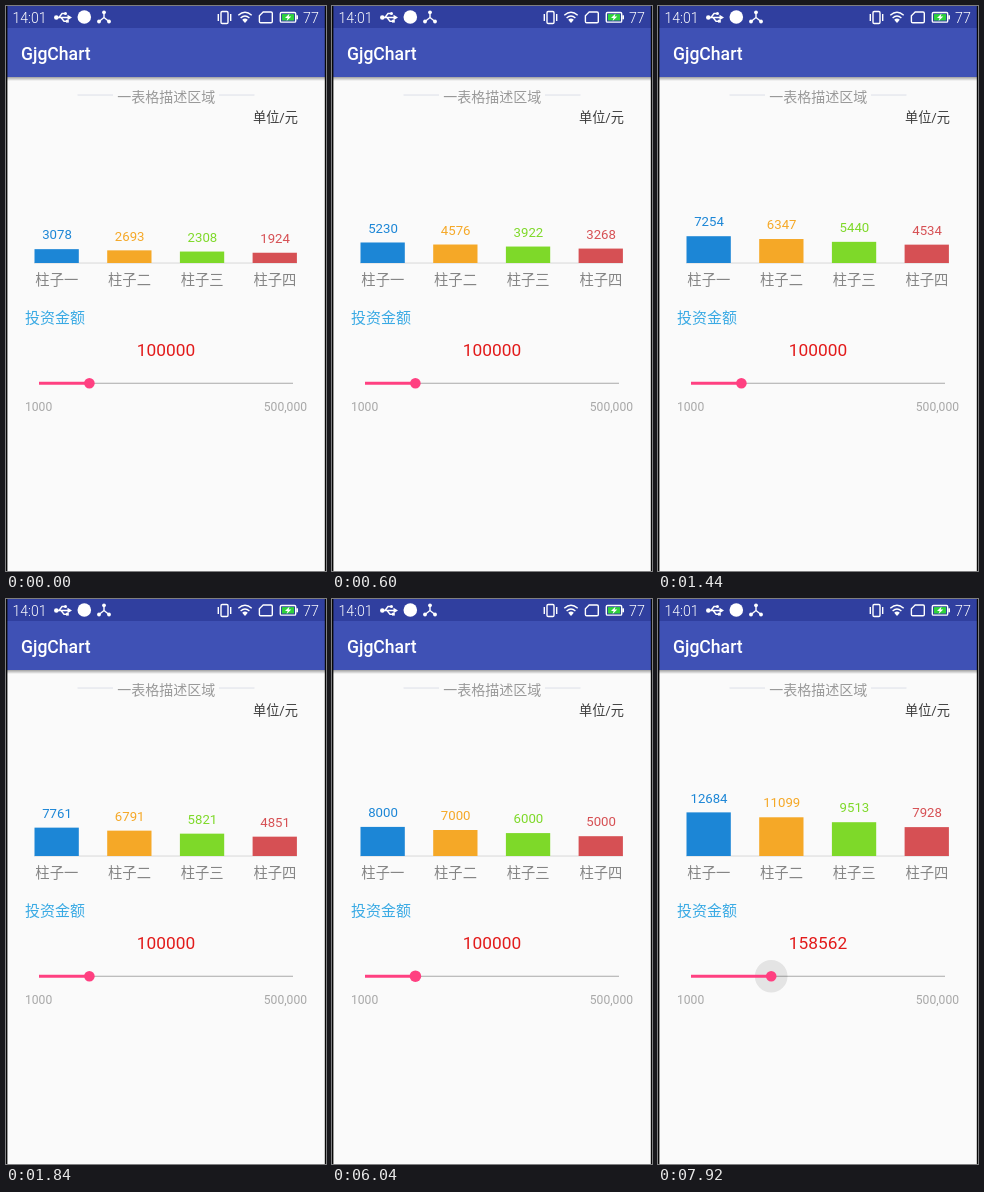
Animation of 320x565 px, one loop 8 s. Source, as an HTML page:

```html
<!DOCTYPE html>
<html lang="zh-CN">
<head>
<meta charset="utf-8">
<title>Chart</title>
<style>
html, body { margin: 0; width: 100%; height: 100%; overflow: hidden; background: #fafafa; }
svg { display: block; width: 320px; height: 565px; }
text { font-family: Roboto, "Noto Sans CJK SC", "Noto Sans CJK", sans-serif; }
.mid { text-anchor: middle; }
.end { text-anchor: end; }
.light { font-weight: 300; }
.icon { fill: none; stroke: #fff; stroke-width: 1.4; }
</style>
</head>
<body>
<svg viewBox="0 0 320 565">
  <defs>
    <linearGradient id="shadow" x2="0" y2="1">
      <stop offset="0" stop-color="#000" stop-opacity=".36"/>
      <stop offset="1" stop-color="#000" stop-opacity="0"/>
    </linearGradient>
  </defs>
  <rect width="320" height="565" fill="#fafafa"/>
  <rect y="71" width="320" height="4" fill="url(#shadow)"/>
  <rect width="320" height="71" fill="#3f51b5"/>
  <rect width="320" height="22" fill="#303f9f"/>

  <g fill="#fff">
    <text class="light" x="6.5" y="16.5" font-size="14">14:01</text>
    <text class="light" x="297" y="16.5" font-size="14.3">77</text>
    <text x="15" y="54" font-size="17.6" font-weight="500">GjgChart</text>
    <!-- status icons, left -->
    <path class="icon" d="M50 11.5H62M53 11.5L56 7.5H59M55 11.5L58 15.2H61"/>
    <circle cx="50.3" cy="11.5" r="2.3"/>
    <path d="M61.5 8.8L66 11.5L61.5 14.2Z"/>
    <circle cx="59.5" cy="7.5" r="1.5"/>
    <rect x="60" y="13.8" width="2.8" height="2.8"/>
    <circle cx="78.3" cy="11" r="6.8"/>
    <path class="icon" d="M98 6.5V11.5L93 15.5M98 11.5L103 15.5"/>
    <circle cx="98" cy="6.3" r="1.9"/>
    <circle cx="93" cy="15.5" r="1.9"/>
    <circle cx="103" cy="15.5" r="1.9"/>
    <!-- status icons, right -->
    <rect class="icon" x="215" y="5.5" width="7" height="12" rx="1.2"/>
    <path class="icon" d="M212.3 8V15M224.7 8V15" stroke-width="1.2"/>
    <path class="icon" d="M232.3 9.2Q239 3.4 245.7 9.2M234.6 11.9Q239 8 243.4 11.9"/>
    <path d="M236.2 13.8Q239 11.4 241.8 13.8L239 17Z"/>
    <path class="icon" d="M257.2 6H265Q266.3 6 266.3 7.3V15.4Q266.3 16.7 265 16.7H254.7Q253.4 16.7 253.4 15.4V9.7Z"/>
    <rect class="icon" x="274.3" y="6.5" width="15.4" height="9.6" rx="1.2" stroke-width="1.2"/>
    <rect x="275.9" y="8.1" width="12.2" height="6.4" fill="#2fd23c"/>
    <rect x="290.3" y="9.3" width="1.7" height="4"/>
    <path d="M283.6 7.6L279 12H281.6L280.6 15L285.3 10.6H282.6Z"/>
  </g>

  <path d="M71.5 89H107M213 89H248.5" stroke="#dcdfe8"/>
  <text class="mid" x="160.3" y="95.6" font-size="14" fill="#999">一表格描述区域</text>
  <text class="end" x="292" y="115.8" font-size="13.2" fill="#3c3c3c">单位/元</text>

  <path d="M28 257H291" stroke="#d8d8d8"/>
  <g id="bars"></g>

  <text x="19" y="317.3" font-size="15" fill="#3aaae4">投资金额</text>
  <text id="amount" class="mid" x="160" y="349.7" font-size="17.3" fill="#e21b1b"></text>
  <path d="M33 377.2H287" stroke="#a9a9a9" stroke-width="1.1"/>
  <circle id="halo" cy="377.2" r="0" fill="#000"/>
  <path id="fill" stroke="#ff4081" stroke-width="3"/>
  <circle id="thumb" cy="377.2" r="5.3" fill="#ff4081"/>
  <text x="19" y="404.8" font-size="12.1" fill="#a8a8a8">1000</text>
  <text class="end" x="301" y="404.8" font-size="12.1" fill="#a8a8a8">500,000</text>

  <path d="M.7 0V565M319.5 0V565" stroke="#080808" stroke-width="1.4"/>
</svg>
<script>
const LOOP = 8000, STEP = 40, BASE = 257;
const $ = id => document.getElementById(id);

// Piecewise linear value through [time, value] points
function track(points, t) {
  if (t <= points[0][0]) return points[0][1];
  for (let i = 1; i < points.length; i++) {
    const [t0, a] = points[i - 1], [t1, b] = points[i];
    if (t <= t1) return a + (b - a) * (t - t0) / (t1 - t0);
  }
  return points[points.length - 1][1];
}

const remaining = [[0, .78434], [600, .58841], [1440, .30527], [2360, 0]];
const dragged = [[6120, 100000], [6240, 103400], [6560, 122000], [6680, 124950],
                 [7360, 124950], [7480, 129600], [7800, 154000], [7920, 158562]];
const haloSize = [[6040, 0], [6240, 16.3], [6840, 16.3], [7320, 0], [7520, 16.3]];
const haloAlpha = [[6000, 0], [6080, .09], [6640, .09], [6840, 0], [7320, 0], [7360, .09]];
const thumbSize = [[6000, 5.3], [6040, 5.8], [6640, 5.8], [6800, 5.3]];

function add(parent, tag, attrs, text = '') {
  const el = document.createElementNS('http://www.w3.org/2000/svg', tag);
  for (const k in attrs) el.setAttribute(k, attrs[k]);
  el.textContent = text;
  return parent.appendChild(el);
}

const bars = [
  ['柱子一', '#1c86d6', .08],
  ['柱子二', '#f5a827', .07],
  ['柱子三', '#7ed929', .06],
  ['柱子四', '#d65054', .05]
].map(([name, fill, rate], i) => {
  const x = 28.5 + 72.7 * i, mid = x + 22.3, box = $('bars');
  add(box, 'text', { x: mid, y: 279.2, class: 'mid', 'font-size': 14.3, fill: '#858585' }, name);
  return {
    rate,
    rect: add(box, 'rect', { x, width: 44.3, fill }),
    label: add(box, 'text', { x: mid + .2, class: 'mid', 'font-size': 13.2, fill })
  };
});

function draw(time) {
  const t = Math.floor(time / STEP) * STEP;
  const grown = 1 - track(remaining, t) ** 2;
  const amount = Math.floor(track(dragged, t));

  for (const { rate, rect, label } of bars) {
    const value = amount * rate * grown;
    const height = 4.3 + value * .0031;
    rect.setAttribute('y', BASE - height);
    rect.setAttribute('height', height);
    label.setAttribute('y', BASE - height - 9.8);
    label.textContent = Math.floor(value + 1e-6);
  }

  const x = 33 + (amount - 1000) / 499000 * 254;
  $('amount').textContent = amount;
  $('fill').setAttribute('d', `M33 377.2H${x}`);
  $('thumb').setAttribute('cx', x);
  $('thumb').setAttribute('r', track(thumbSize, t));
  $('halo').setAttribute('cx', x);
  $('halo').setAttribute('r', t < 6840 || t >= 7320 ? track(haloSize, t) : 0);
  $('halo').setAttribute('opacity', track(haloAlpha, t));
}

const start = performance.now();
function tick() {
  draw((performance.now() - start) % LOOP);
  requestAnimationFrame(tick);
}
tick();
</script>
</body>
</html>
```
